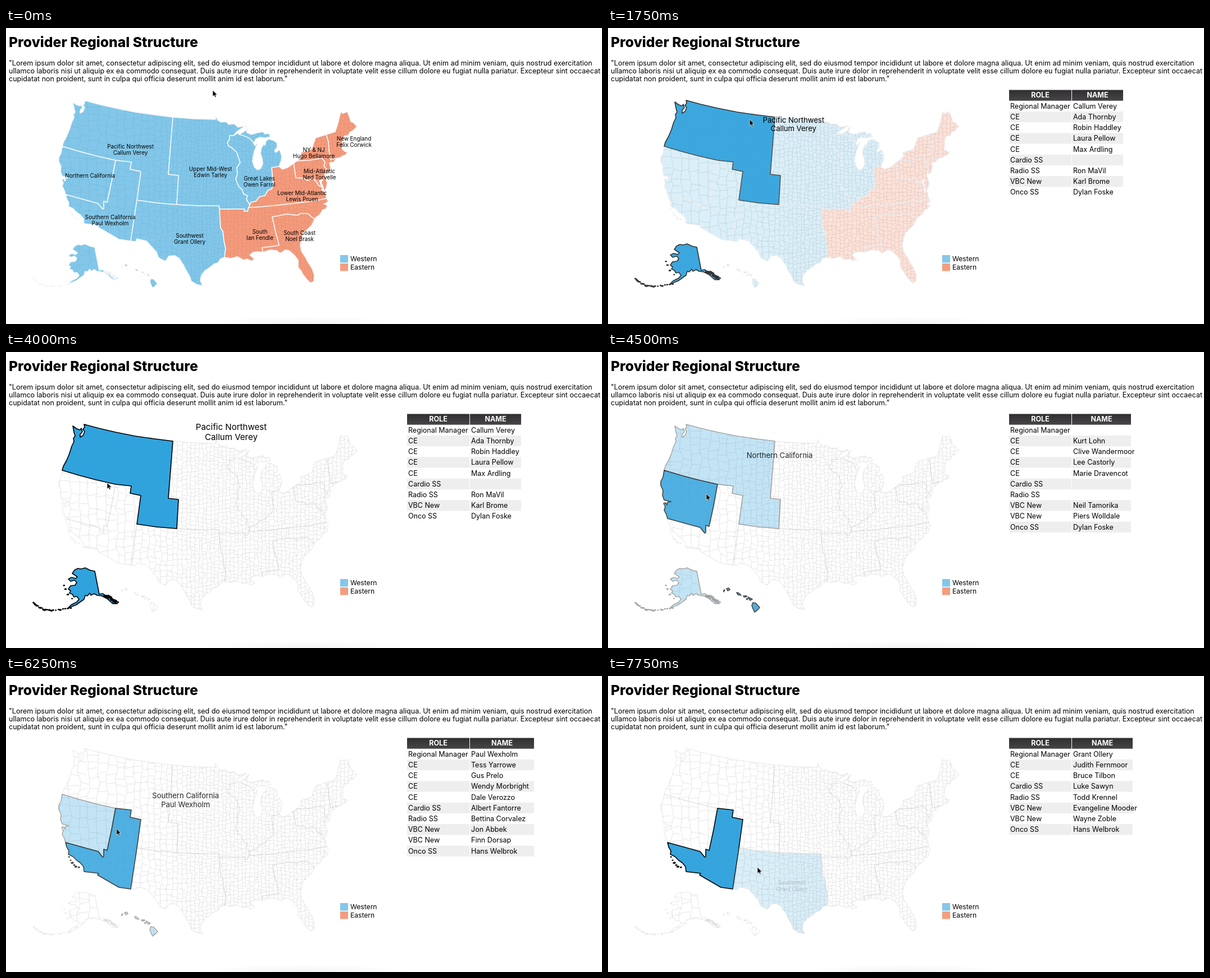
These frames come from a looping animation (1061x528 px, 8000 ms). An HTML page:

```html
<!DOCTYPE html>
<html lang="en">
<head>
<meta charset="utf-8">
<title>Provider Regional Structure</title>
<style>
html, body { margin: 0; width: 100%; height: 100%; overflow: hidden; background: #fff; }
svg { display: block; width: 100%; height: 100%; font: 12.5px Inter, "Open Sans", sans-serif; }
.region { stroke-width: 1.6; stroke-linejoin: round; }
.label { text-anchor: middle; }
.head { font-weight: 700; fill: #fff; text-anchor: middle; }
</style>
</head>
<body>
<svg viewBox="0 0 1061 528">
  <defs>
    <radialGradient id="glow"><stop stop-color="#f4f4f4"/><stop offset="1" stop-color="#fff"/></radialGradient>
    <linearGradient id="bar" x2="0" y2="1"><stop stop-color="#302e30"/><stop offset="1" stop-color="#474547"/></linearGradient>
    <clipPath id="landClip"><path id="landShape"/></clipPath>
  </defs>
  <ellipse cx="530" cy="527" rx="190" ry="12" fill="url(#glow)"/>
  <text x="5" y="34" font-size="24.7" font-weight="800">Provider Regional Structure</text>
  <text y="67">
    <tspan x="5">"Lorem ipsum dolor sit amet, consectetur adipiscing elit, sed do eiusmod tempor incididunt ut labore et dolore magna aliqua. Ut enim ad minim veniam, quis nostrud exercitation</tspan>
    <tspan x="5" dy="14">ullamco laboris nisi ut aliquip ex ea commodo consequat. Duis aute irure dolor in reprehenderit in voluptate velit esse cillum dolore eu fugiat nulla pariatur. Excepteur sint occaecat</tspan>
    <tspan x="5" dy="14">cupidatat non proident, sunt in culpa qui officia deserunt mollit anim id est laborum."</tspan>
  </text>
  <g fill="none" stroke="#ccc" stroke-width=".5">
    <path id="counties" clip-path="url(#landClip)"/>
    <path id="coast"/>
  </g>
  <g id="regions"></g>
  <g id="legend"></g>
  <g id="labels"></g>
  <g id="tables"></g>
  <path id="cursor" d="M0 0V11.2L2.6 8.9 4.3 12.6 6.2 11.8 4.6 8.2H8Z" stroke="#fff" stroke-width=".7"/>
</svg>
<script>
const LOOP = 8000, STEP = 250;
const WEST = '#30a2dc', EAST = '#ee5a27';
const $ = id => document.getElementById(id);
const clamp = v => Math.max(0, Math.min(1, v));
const mix = (a, b, k) => a + (b - a) * k;
const ease = t => t < .5 ? 4 * t ** 3 : 1 - 4 * (1 - t) ** 3;

let seed = 7;
const random = () => (seed = seed * 16807 % 2147483647) / 2147483647;
const jitter = size => (random() - .5) * size;

// Ragged islets scattered along a quadratic curve.
function islets(count, size, spread, [ax, ay], [bx, by], [cx, cy]) {
  let d = '';
  for (let i = 0; i < count; i++) {
    const k = i / (count - 1), j = 1 - k;
    const x = j * j * ax + 2 * j * k * bx + k * k * cx + jitter(spread);
    const y = j * j * ay + 2 * j * k * by + k * k * cy + jitter(spread);
    const r = size * (.5 + random());
    d += `M${x - r} ${y}l${r} ${-r * .7} ${r} ${r * .5} ${-r * .8} ${r * .6}z`;
  }
  return d;
}

const aleutians = islets(22, 1.3, 2.5, [50, 446], [62, 470], [116, 456]);
const panhandle = islets(20, 2, 4, [174, 435], [187, 438], [196, 448]);
const bering = islets(4, 1.5, 3, [103, 416], [108, 428], [117, 440]);
const channelIslands = islets(6, 1.5, 2, [113, 322], [116, 338], [130, 342]);

const regions = [
  { id: 'northwest', color: WEST, title: 'Pacific Northwest', name: 'Callum Verey', x: 221.5, y: 211, titleX: 401,
    d: 'M139 129L165 136 195 143 230 150 265 155 297 159 289 261 307 263 304 315 268 312 233 307 240 256 221 252 223 239 195 236 160 228 130 220 100 211 102 204 108 193 113 181 117 168 121 160 120 154 123 150 121 143 119 132 126 137 132 139 134 136 136 142 132 147 132 152 137 149 140 142 137 138 140 134Z' +
       'M134 387L141 385 149 389 158 391 166 432 172 431 180 436 190 440 198 449 190 449 180 440 170 435 162 434 157 431 151 434 149 430 145 435 141 434 139 441 132 446 125 451 115 455 109 458 116 451 126 446 130 441 126 436 121 437 118 432 113 430 115 426 111 423 115 417 123 416 126 411 122 407 115 409 111 405 117 402 124 404 127 401 121 397 118 395 122 389 128 386Z' + aleutians + panhandle + bering },
  { id: 'north', color: WEST, title: 'Northern California', name: '', x: 149.5, y: 263, titleX: 407,
    d: 'M100 211L130 220 160 228 195 236 188 274 180 311 174 309 174 322 172 323 164 313 135 305 106 297 104 290 100 282 102 276 99 270 103 269 105 273 106 268 112 267 104 265 100 264 97 256 98 247 94 238 94 231 98 223Z' +
       'M258 447L263 448 270 456 265 461 261 464 258 458 256 452ZM211 422L215 421 217 424 213 426ZM229 429L233 430 237 434 231 433ZM241 435L247 435 246 437 242 437ZM249 437L253 439 257 441 253 443ZM246 440L249 440 248 442ZM206 425L208 424 206 428Z' },
  { id: 'south', color: WEST, title: 'Southern California', name: 'Paul Wexholm', x: 185.5, y: 337, titleX: 407,
    d: 'M106 297L135 305 164 313 172 323 174 322 174 309 180 311 188 274 195 236 223 239 221 252 240 256 233 307 222 380 201 377 163 355 165 352 139 349 138 340 132 333 126 329 119 322 111 318 112 312 108 305Z' + channelIslands },
  { id: 'southwest', color: WEST, title: 'Southwest', name: 'Grant Ollery', x: 327, y: 370, titleX: 372,
    d: 'M233 307L268 312 304 315 342 317 379 317 380 323 382 357 386 362 388 380 391 393 389 409 382 412 377 419 370 421 362 428 354 433 348 441 346 450 350 460 338 457 330 452 327 443 321 433 316 423 308 411 300 406 290 407 284 416 277 413 271 409 268 400 259 390 250 380 233 376 231 381 222 380Z' },
  { id: 'midwest', color: WEST, title: 'Upper Mid-West', name: 'Edwin Tarley', x: 364, y: 251,
    d: 'M297 159L335 162 373 163 373 156 377 164 383 168 391 167 397 172 406 171 413 177 428 174 418 180 410 186 405 192 398 192 398 199 394 204 396 210 404 215 411 222 414 232 417 240 411 249 412 260 409 270 414 282 420 288 423 296 430 299 428 306 434 315 432 320 430 327 424 327 425 323 380 323 379 317 342 317 304 315 307 263 289 261Z' },
  { id: 'lakes', color: WEST, title: 'Great Lakes', name: 'Owen Farrol', x: 451, y: 268,
    d: 'M398 192L405 192 413 187 415 190 423 192 434 197 439 202 443 210 448 203 447 208 443 217 440 228 439 238 442 248 448 253 454 250 457 242 456 233 453 224 455 213 459 207 461 209 463 201 468 198 475 200 482 204 483 212 478 219 480 222 487 217 491 228 490 236 486 247 473 249 476 280 473 287 466 290 461 299 451 301 445 309 436 311 434 315 428 306 430 299 423 296 420 288 414 282 409 270 412 260 411 249 417 240 414 232 411 222 404 215 396 210 394 204 398 199Z' +
       'M415 190L423 185 430 180 428 186 437 190 447 187 458 185 460 189 468 188 471 194 461 196 452 195 445 198 441 205 434 197 423 192ZM427 179L433 176 430 180Z' },
  { id: 'lower', color: EAST, title: 'Lower Mid-Atlantic', name: 'Lewis Pruen', x: 527, y: 294,
    d: 'M473 249L486 247 492 252 501 249 512 241 516 267 530 268 537 272 545 268 552 273 556 280 564 284 562 290 569 293 570 300 571 304 545 309 520 312 475 317 441 320 432 320 436 311 445 309 451 301 461 299 466 290 473 287 476 280Z' },
  { id: 'deep', color: EAST, title: 'South', name: 'Ian Fendle', x: 452, y: 363,
    d: 'M380 323L425 323 424 327 430 327 432 320 441 320 475 317 520 312 545 309 571 304 574 310 566 314 573 316 569 323 564 324 559 333 554 336 549 341 537 331 524 331 519 334 500 332 474 337 479 360 484 378 486 388 456 392 457 400 448 399 440 400 434 405 443 412 437 416 429 412 423 414 412 408 400 411 389 409 391 393 388 380 386 362 382 357Z' },
  { id: 'coastal', color: EAST, title: 'South Coast', name: 'Noel Brask', x: 522.5, y: 365,
    d: 'M474 337L500 332 519 334 524 331 537 331 549 341 545 351 538 358 530 365 526 376 524 388 526 398 532 407 538 418 545 429 549 441 548 452 542 455 535 448 528 439 526 434 520 427 520 414 513 405 504 397 497 396 488 402 482 397 470 396 457 400 456 392 486 388 484 378 479 360Z' },
  { id: 'middle', color: EAST, title: 'Mid-Atlantic', name: 'Ned Torvelle', x: 558, y: 255,
    d: 'M512 241L518 237 540 236 562 232 568 239 566 246 571 252 567 259 569 268 572 276 570 286 566 291 564 282 561 276 564 270 558 272 562 284 556 280 552 273 545 268 537 272 530 268 516 267Z' },
  { id: 'york', color: EAST, title: 'NY & NJ', name: 'Hugo Bellamore', x: 548, y: 217,
    d: 'M512 241L518 237 526 229 525 222 536 219 545 215 547 207 551 196 570 190 574 203 575 218 578 235 590 232 582 240 576 240 578 249 575 258 571 261 567 259 571 252 566 246 568 239 562 232 540 236 518 237Z' },
  { id: 'england', color: EAST, title: 'New England', name: 'Felix Corwick', x: 619.5, y: 197,
    d: 'M570 190L586 185 590 173 596 149 600 152 608 149 614 167 619 169 625 176 618 183 612 186 609 192 603 192 599 202 600 210 598 215 603 220 608 221 605 226 600 228 595 231 578 235 575 218 574 203Z' }
];

const selections = [
  { at: 1500, id: 'northwest', width: 91, rows: ['Regional Manager|Callum Verey', 'CE|Ada Thornby', 'CE|Robin Haddley', 'CE|Laura Pellow', 'CE|Max Ardling', 'Cardio SS|', 'Radio SS|Ron MaVil', 'VBC New|Karl Brome', 'Onco SS|Dylan Foske'] },
  { at: 4250, id: 'north', width: 105, rows: ['Regional Manager|', 'CE|Kurt Lohn', 'CE|Clive Wandermoor', 'CE|Lee Castorly', 'CE|Marie Dravencot', 'Cardio SS|', 'Radio SS|', 'VBC New|Neil Tamorika', 'VBC New|Piers Wolldale', 'Onco SS|Dylan Foske'] },
  { at: 6000, id: 'south', width: 114, rows: ['Regional Manager|Paul Wexholm', 'CE|Tess Yarrowe', 'CE|Gus Prelo', 'CE|Wendy Morbright', 'CE|Dale Verozzo', 'Cardio SS|Albert Fantorre', 'Radio SS|Bettina Corvalez', 'VBC New|Jon Abbek', 'VBC New|Finn Dorsap', 'Onco SS|Hans Welbrok'] },
  { at: 7750, id: 'southwest', width: 108, rows: ['Regional Manager|Grant Ollery', 'CE|Judith Fernmoor', 'CE|Bruce Tilbon', 'Cardio SS|Luke Sawyn', 'Radio SS|Todd Krennel', 'VBC New|Evangeline Mooder', 'VBC New|Wayne Zoble', 'Onco SS|Hans Welbrok'] }
];

// Time, x and y of the pointer tip.
const pointerPath = [
  [0, 368, 111], [250, 364, 105], [1250, 260, 157], [1500, 252, 163], [2750, 252, 163], [4000, 180, 233],
  [4500, 175, 253], [5750, 175, 253], [6000, 192, 268], [6750, 206, 281], [7750, 266, 341]
];

// Masonry of uneven cells, wide in the west and narrow in the east.
function countyLines() {
  let d = '';
  for (let x = 45, w; x < 630; x += w) {
    w = 17 - 10 * clamp((x - 170) / 160);
    let left = x, top = 120;
    for (let y = 120; y < 468; y += w * (.75 + random() * .5)) {
      const nx = x + jitter(w * .5), ny = y + jitter(w * .3);
      d += `M${left} ${top}L${nx} ${ny} ${x + w + jitter(w * .4)} ${ny + jitter(w * .6)}`;
      left = nx;
      top = ny;
    }
  }
  return d;
}

function tableMarkup({ rows, width }) {
  const left = 714, second = 826, pitch = 19.23;
  const cells = (y, fill) =>
    `<rect x="${left}" y="${y}" width="111" height="${pitch}" fill="${fill}"/>` +
    `<rect x="${second}" y="${y}" width="${width}" height="${pitch}" fill="${fill}"/>`;
  const body = rows.map((row, i) => {
    const [role, name] = row.split('|'), y = 129.6 + i * pitch;
    return (i % 2 ? cells(y, '#eee') : '') +
      `<text x="716" y="${y + 14}">${role}</text><text x="828" y="${y + 14}">${name}</text>`;
  });
  return `<g display="none">${cells(110.5, 'url(#bar)')}` +
    `<text class="head" x="769.5" y="124.3">ROLE</text>` +
    `<text class="head" x="${second + width / 2}" y="124.3">NAME</text>${body.join('')}</g>`;
}

const land = regions.map(r => r.d).join('');
$('landShape').setAttribute('d', land);
$('coast').setAttribute('d', land);
$('counties').setAttribute('d', countyLines());
$('regions').innerHTML = regions.map(r => `<path class="region" d="${r.d}" fill="${r.color}"/>`).join('');
$('labels').innerHTML = regions.map(r =>
  `<text class="label"><tspan x="0">${r.title.replace('&', '&amp;')}</tspan><tspan x="0" dy="1.2em">${r.name}</tspan></text>`).join('');
$('tables').innerHTML = selections.map(tableMarkup).join('');
$('legend').innerHTML = [['Western', WEST], ['Eastern', EAST]].map(([text, color], i) =>
  `<rect x="595" y="${405 + i * 15}" width="14" height="13.5" fill="${color}" opacity=".6"/>` +
  `<text x="613" y="${416.3 + i * 15}" font-size="12.1">${text}</text>`).join('');

function drawRegion(region, i, current, previous, p) {
  const shape = $('regions').children[i], label = $('labels').children[i];
  const active = current?.id === region.id;
  const base = previous ? 0 : .6;
  let opacity = base * (1 - p * p), shade = 255;
  if (active) {
    opacity = mix(base, 1, p);
    shade = Math.round(255 * (1 - p));
  } else if (previous?.id === region.id) {
    opacity = 1 - p * p;
    shade = 0;
  }
  shape.setAttribute('opacity', opacity);
  shape.setAttribute('stroke', `rgb(${shade},${shade},${shade})`);

  const k = active ? p ** 3 : 0;
  const x = mix(region.x, region.titleX ?? region.x, k), y = mix(region.y + 3.5, 139, k);
  label.setAttribute('transform', `translate(${x} ${y})`);
  label.setAttribute('font-size', mix(9.9, 15.1, k));
  label.setAttribute('opacity', !current ? 1 : !active ? 0 : previous ? p : 1);
}

function drawPointer(t) {
  const next = pointerPath.findIndex(key => key[0] > t);
  const to = pointerPath.at(next), from = next < 0 ? to : pointerPath[next - 1];
  const k = to === from ? 0 : (t - from[0]) / (to[0] - from[0]);
  $('cursor').setAttribute('transform', `translate(${mix(from[1], to[1], k)} ${mix(from[2], to[2], k)})`);
}

function draw() {
  const t = Math.floor(performance.now() % LOOP / STEP) * STEP;
  const index = selections.filter(s => s.at <= t).length - 1;
  const current = selections[index], previous = selections[index - 1];
  const p = current ? ease(clamp((t - current.at + 280) / 800)) : 0;
  regions.forEach((region, i) => drawRegion(region, i, current, previous, p));
  [...$('tables').children].forEach((table, i) => table.setAttribute('display', i === index ? 'inline' : 'none'));
  drawPointer(t);
  requestAnimationFrame(draw);
}
draw();
</script>
</body>
</html>
```
